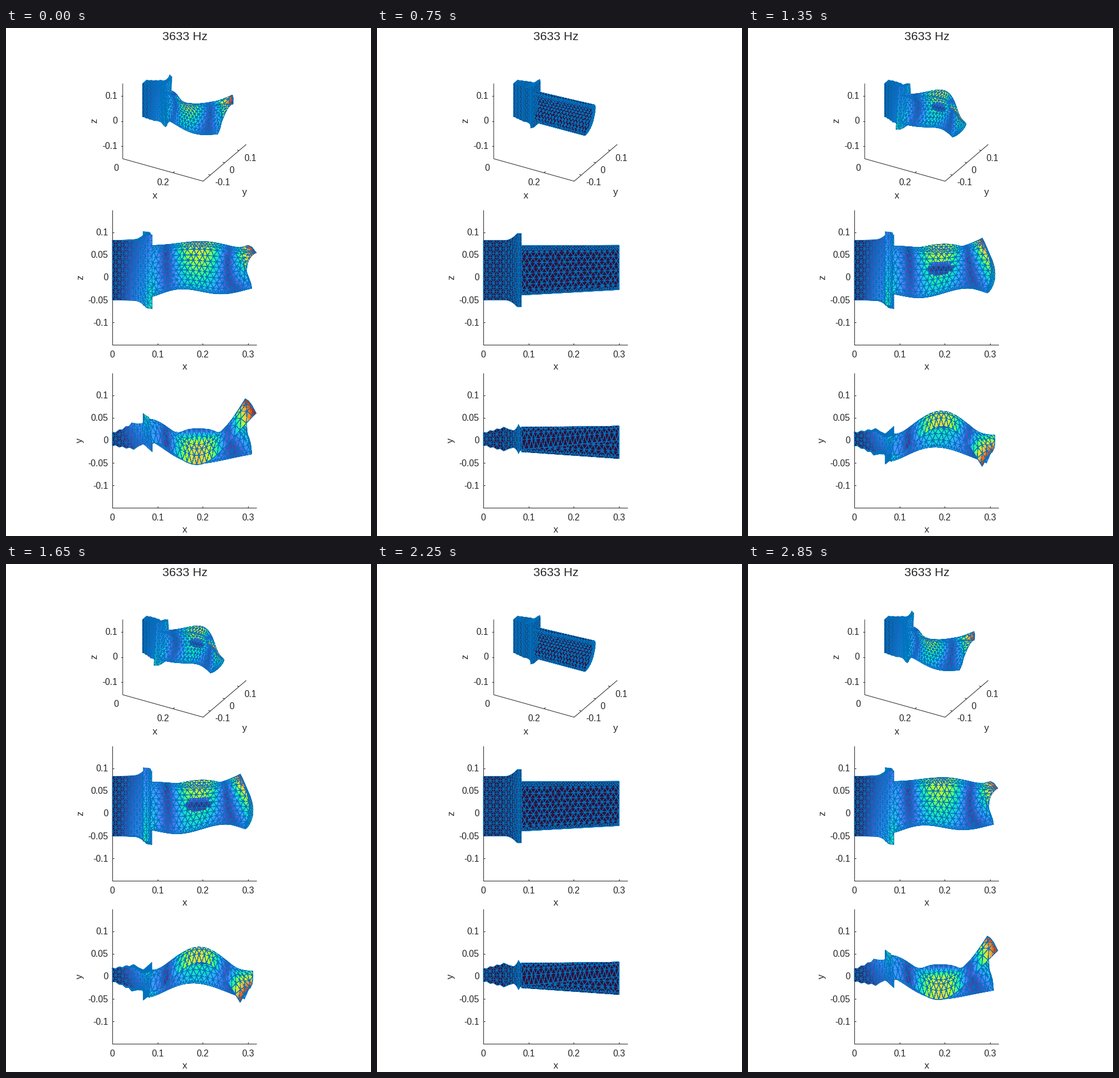
Animation, 635 px wide and 882 px high, one loop 3 s. Source, as a matplotlib script:

```python
import numpy as np
import matplotlib.pyplot as plt
from matplotlib.animation import FuncAnimation
from matplotlib.collections import PolyCollection
from matplotlib.tri import Triangulation

W, H, DPI = 635, 882, 100
FRAMES, INTERVAL = 20, 150
PX = 72 / DPI
INK = "#262626"
MESH = (0, 0.447, 0.741, 1)
COLOR_MAX = 0.068
X0, X1 = 0.0845, 0.3
rng = np.random.default_rng(4)
turbo = plt.get_cmap("turbo")

plt.rcParams["font.family"] = "Liberation Sans"
fig = plt.figure(figsize=(W / DPI, H / DPI), dpi=DPI, facecolor="white")
ax = fig.add_axes([0, 0, 1, 1])
ax.set(xlim=(0, W), ylim=(H, 0))
ax.axis("off")


# ---- meshes ----
def grid_tris(n, m, wrap=False):
    """Triangles of an n by m grid, diagonals alternating."""
    tris = []
    for i in range(n - 1):
        for j in range(m if wrap else m - 1):
            k = (j + 1) % m
            a, b, c, d = i * m + j, (i + 1) * m + j, (i + 1) * m + k, i * m + k
            tris += [(a, b, c), (a, c, d)] if (i + j) % 2 else [(a, b, d), (b, c, d)]
    return np.array(tris)


def sheet(rows, heights):
    """Staggered triangle mesh over (x, v); rows holds (v, cells)."""
    us, vs, hs = [], [], []
    for i, ((v, n), h) in enumerate(zip(rows, heights)):
        if i % 2:
            u = np.r_[0, (np.arange(n) + 0.5) / n, 1]
        else:
            u = np.linspace(0, 1, n + 1)
        if 0 < i < len(rows) - 1:
            u[1:-1] += rng.uniform(-0.14, 0.14, len(u) - 2) / n
        us.append(u)
        vs.append(np.full(len(u), v))
        hs.append(np.full(len(u), h))
    u, v, h = map(np.concatenate, (us, vs, hs))
    x = X0 + (X1 - X0) * u
    return x, v, Triangulation(x, h).triangles


def curve(xs, ys):
    fit = np.polyfit((np.array(xs) - 0.19) * 10, ys, 5)
    return lambda x: np.polyval(fit, (x - 0.19) * 10)


# sideways motion of the top and bottom edges, vertical motion of the bottom
STATIONS = [0.085, 0.12, 0.155, 0.19, 0.23, 0.26, 0.3]
top_dy = curve(STATIONS, [0.013, 0, -0.030, -0.043, -0.026, 0.008, 0.060])
low_dy = curve(STATIONS, [0.022, 0.004, -0.013, -0.018, -0.011, -0.002, 0.010])
low_dz = curve([0.085, 0.12, 0.15, 0.2, 0.23, 0.27, 0.3],
               [-0.003, 0.006, 0.010, 0.001, -0.005, -0.004, 0.003])


def blade(x, v, back):
    """Rest position and mode displacement of one face of the blade."""
    q = (x - X0) / (X1 - X0)
    y = (-0.025 - 0.015 * q) * (1 - v) + (-0.02 + 0.02 * q) * v
    if back:
        y = y + (0.052 - 0.007 * q) * np.sqrt(1 - abs(2 * v - 1) ** 3)
    else:
        y = y + 0.03 * 4 * v * (1 - v)
    z = (-0.039 + 0.012 * q) * (1 - v) + (0.07 + 0.001 * q) * v

    tip = np.clip((x - 0.2) / 0.1, 0, 1) ** 2
    mid = np.exp(-((x - 0.195) / 0.065) ** 2)
    root = np.exp(-(x - X0) / 0.03)
    blend, lip = v, v**4
    if back:
        s = np.clip((v - 0.4) / 0.4, 0, 1)
        blend = v * (1 - tip) + tip * s * s * (3 - 2 * s)
        lip = v**20
    dx = tip * (0.008 - 0.0525 * v + 0.0625 * v**2) - 0.15 * y * root
    dy = low_dy(x) * (1 - blend) + top_dy(x) * blend
    dz = low_dz(x) * (1 - v) + 0.009 * mid * v**4 - 0.017 * tip * lip
    if back:
        arch = abs(np.sin(np.pi * v)) ** 0.4
        dx = dx - 0.018 * tip * arch * v
        dz = dz + 0.02 * tip * arch - 0.023 * mid * np.sin(np.pi * v**4)
        r2 = ((v - 0.484) / 0.205) ** 2 + ((x - 0.192) / 0.046) ** 2
        still = np.exp(-r2**3)
        dx, dy, dz = (d * (1 - still) for d in (dx, dy, dz))
        dy = dy - 0.003 * still
    return np.stack([x, y, z], 1), np.stack([dx, dy, dz], 1)


def foot_shape(x, a, b):
    """Fir-tree foot with flange; a and b run 0..1 across y and z."""
    teeth = 0.0135 + 0.0115 * x / 0.045 + 0.0015 * np.cos(np.pi * x / 0.0075)
    neck = np.interp(x, [0.045, 0.056, 0.067, 0.073, 0.078, 0.0805, 0.084],
                     [0.0265, 0.0215, 0.0185, 0.022, 0.032, 0.027, 0.024])
    half = np.where(x < 0.0455, teeth, neck)
    flare = 0.015 * np.clip((x - 0.048) / 0.027, 0, 1) ** 2
    y = 0.003 + half * (2 * a - 1)
    z = (-0.05 - flare) * (1 - b) + (0.082 + flare) * b
    w = (x / 0.08) ** 1.5
    yn, zn = (y - 0.003) / 0.031, (z - 0.016) / 0.081
    disp = [-0.009 * yn * abs(yn) ** 3 * w, w * (0.015 + 0.010 * yn * zn), 0.004 * w * yn]
    return np.stack([x, y, z], 1), np.stack(disp, 1)


parts = []  # position, displacement, triangles, smooth shading, hide far side

rows = [(0, 34), (0.03, 34)] + [(v, 17) for v in np.linspace(0.11, 0.87, 8)]
rows += [(0.93, 34), (0.965, 34), (1, 34)]
x, v, tris = sheet(rows, [0.1 * r[0] for r in rows])
parts.append((*blade(x, v, False), tris, True, True))

levels = [0, 0.03, 0.1, 0.2, 0.32, 0.44, 0.56, 0.68, 0.8, 0.9, 0.97, 1]
rows = [(v, 20) for v in levels]
x, v, tris = sheet(rows, 0.0108 * np.arange(len(rows)))
parts.append((*blade(x, v, True), tris[:, ::-1], True, False))

v = (1 - np.cos(np.linspace(0, np.pi, 15))) / 2
near, far = (blade(np.full(15, X1), v, side) for side in (False, True))
cap = [np.concatenate([n * (1 - t) + f * t for t in np.linspace(0, 1, 4)])
       for n, f in zip(near, far)]
parts.append((*cap, grid_tris(4, 15), False, True))

cols = np.r_[np.arange(7) * 0.0075, 0.05, 0.056, 0.062, 0.067, 0.071,
             0.075, 0.078, 0.0805, 0.084]
NZ, NY = 14, 4
up, across = np.arange(NZ) / NZ, np.arange(NY) / NY
ring_a = np.r_[0 * up, across, 0 * up + 1, 1 - across]
ring_b = np.r_[up, 0 * across + 1, 1 - up, 0 * across]
n = len(ring_a)
foot = foot_shape(np.repeat(cols, n), np.tile(ring_a, len(cols)), np.tile(ring_b, len(cols)))
parts.append((*foot, grid_tris(len(cols), n, True), False, True))

a, b = np.meshgrid(np.linspace(0, 1, NY + 1), np.linspace(0, 1, NZ + 1), indexing="ij")
face = foot_shape(np.full(a.size, cols[-1]), a.ravel(), b.ravel())
parts.append((*face, grid_tris(NY + 1, NZ + 1), False, True))

offsets = np.cumsum([0] + [len(p[0]) for p in parts[:-1]])
REST = np.concatenate([p[0] for p in parts])
MODE = np.concatenate([p[1] for p in parts])
TRIS = np.concatenate([p[2] + o for p, o in zip(parts, offsets)])
SMOOTH = np.concatenate([np.full(len(p[2]), p[3]) for p in parts])
CULL = np.concatenate([np.full(len(p[2]), p[4]) for p in parts])
SIZE = np.linalg.norm(MODE, axis=1) / COLOR_MAX

# ---- views: screen origin, screen vectors of x, y, z, direction to the eye ----
VIEWS = [
    ((240.5, 129.75), [(437.5, 122), (250, -213), (0, -435)], (0.43, -0.75, 0.5)),
    ((185, 433), [(786, 0), (0, 0), (0, -784)], (0, -1, 0)),
    ((185, 716), [(786, 0), (0, -784), (0, 0)], (0, 0, 1)),
]


# ---- axes and labels ----
def label(x, y, s, size=15.5, ha="center"):
    """Text whose digits are centred on y."""
    ax.text(x, y + 0.345 * size, s, size=size * PX, color=INK, ha=ha, va="baseline")


def axis_name(x, y, s, upright=True):
    shift = 16.5 * (0.16 if s == "y" else 0.26)
    dx, dy, turn = (0, shift, 0) if upright else (shift, 0, 90)
    ax.text(x + dx, y + dy, s, size=16.5 * PX, color=INK, ha="center",
            va="baseline", rotation=turn, rotation_mode="anchor")


def line(*pts):
    ax.plot(*zip(*pts), color=INK, lw=PX, zorder=1, solid_capstyle="butt")


def space(x, y, z):
    o, m, _ = VIEWS[0]
    return np.array(o) + np.array([x, y, z]) @ np.array(m)


label(311, 14, "3633 Hz", 21)

line(space(0, -0.15, 0.15), space(0, -0.15, -0.15),
     space(0.32, -0.15, -0.15), space(0.32, 0.15, -0.15))
for z, s in [(0.1, "0.1"), (0, "0"), (-0.1, "-0.1")]:
    px, py = space(0, -0.15, z)
    line((px - 3, py), (px, py))
    label(193.5, py - 1, s, ha="right")
line(space(0.2, -0.15, -0.15), space(0.2, -0.139, -0.15))
for y in (-0.1, 0, 0.1):
    line(space(0.32, y, -0.15), space(0.312, y, -0.15))
for px, py, s in [(192, 243, "0"), (273, 268, "0.2"), (377, 268, "-0.1"),
                  (393, 247, "0"), (425, 226, "0.1")]:
    label(px, py, s)
axis_name(259, 292, "x")
axis_name(415, 287, "y")
axis_name(154, 161, "z", False)

for zero, name in ((433, "z"), (716, "y")):
    base = zero + 117
    line((185, zero - 117), (185, base), (436, base))
    for val in (0.1, 0.05, 0, -0.05, -0.1):
        py = zero - 784 * val
        line((185, py), (188, py))
        label(178, py, f"{val:g}", ha="right")
    for val in (0, 0.1, 0.2, 0.3):
        px = 185 + 786 * val
        line((px, base), (px, base - 3))
        label(px, base + 17, f"{val:g}")
    axis_name(311, base + 39, "x")
    axis_name(130, zero, name, False)


# ---- drawing ----
layers = []
for _ in VIEWS:
    layer = PolyCollection([], zorder=2, joinstyle="round")
    ax.add_collection(layer, autolim=False)
    layers.append(layer)


def quarter(t):
    """Split triangles at their edge midpoints: three corners, one centre."""
    p, q, r = t[:, 0], t[:, 1], t[:, 2]
    pq, qr, rp = (p + q) / 2, (q + r) / 2, (r + p) / 2
    corners = np.concatenate([np.stack(s, 1) for s in
                              [(rp, p, pq), (pq, q, qr), (qr, r, rp)]])
    return corners, np.stack([pq, qr, rp], 1)


def draw_view(layer, view, pos, value):
    origin, vectors, eye = view
    eye = np.array(eye)
    tri = pos[TRIS]
    normal = np.cross(tri[:, 1] - tri[:, 0], tri[:, 2] - tri[:, 0])
    keep = ~CULL | (normal @ eye > 0)
    # each vertex carries x, y, z and its colour value
    tri = np.concatenate([tri, value[TRIS][..., None]], 2)[keep]
    smooth = SMOOTH[keep]
    corner, centre = quarter(tri[smooth])
    flat = tri[~smooth]

    # corner and centre fills, then the outer edges of corners, then flat cells
    cells = np.concatenate([corner, centre, corner, flat])
    kinds = np.repeat([0, 1, 2], [len(corner) + len(centre), len(corner), len(flat)])
    mean = cells.mean(1)
    order = np.argsort(mean[:, :3] @ eye, kind="stable")
    cells, kinds, mean = cells[order], kinds[order], mean[order]

    pts = np.array(origin) + cells[..., :3] @ np.array(vectors)
    last = np.where((kinds == 1)[:, None], pts[:, 1], pts[:, 0])
    faces = turbo(mean[:, 3])
    faces[kinds == 1, 3] = 0
    edges = np.zeros_like(faces)
    edges[kinds > 0] = MESH
    layer.set_verts(np.concatenate([pts, last[:, None]], 1))
    layer.set_facecolor(faces)
    layer.set_edgecolor(edges)
    layer.set_linewidth(np.where(kinds > 0, PX, 0))
    layer.set_antialiased(kinds > 0)


def update(i):
    swing = np.cos(2 * np.pi * i / FRAMES)
    pos = REST + MODE * swing
    value = np.clip(SIZE * abs(swing), 0, 1)
    for layer, view in zip(layers, VIEWS):
        draw_view(layer, view, pos, value)
    return layers


anim = FuncAnimation(fig, update, frames=FRAMES, interval=INTERVAL,
                     repeat=True, repeat_delay=0, blit=False)
plt.show()
```
